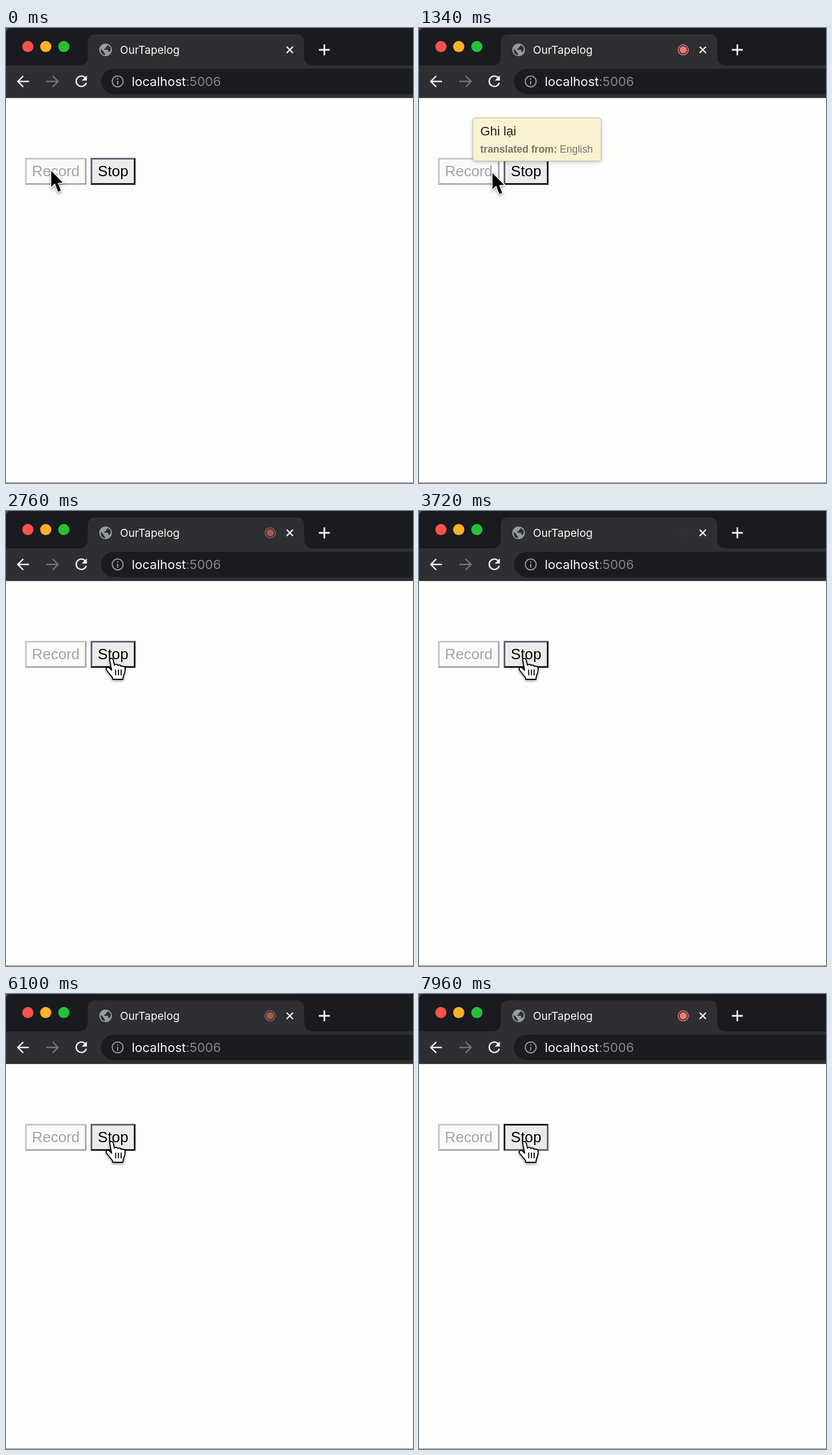
These frames come from a looping animation (707 px wide and 792 px high, 8 s). An HTML page:

```html
<!DOCTYPE html>
<html lang="en">
<head>
<meta charset="utf-8">
<title>Recorder tab</title>
<style>
html, body { margin: 0; width: 100%; height: 100%; overflow: hidden; background: #fdfdfc; }
#stage { position: relative; width: 707px; height: 792px; overflow: hidden; }
svg { position: absolute; left: 0; top: 0; }
.ui { font-family: Inter, Roboto, sans-serif; }
.button, #tip { position: absolute; box-sizing: border-box; font-family: "Liberation Sans", Arial, sans-serif; white-space: nowrap; }
.button { top: 226px; height: 47px; border: 3px solid; font-size: 25.7px; line-height: 40px; display: flex; justify-content: center; }
#record { left: 33px; width: 107px; color: #a5a5a5; background: #fafafa; border-color: #c9c7d1 #adadae #adadae #c9c7d1; }
#stop { left: 147px; width: 78px; color: #000; background: #ebebed; border-color: #686278 #1b1a20 #1b1a20 #686278; }
#stop.pressed { border-color: #1b1a20 #686278 #686278 #1b1a20; }
#tip { left: 93px; top: 156px; width: 224px; height: 76px; border: 1.5px solid #bfbba9; border-radius: 6px; background: #f8f2d1; box-shadow: 0 2px 6px #0003; }
#tip div { position: absolute; left: 12.5px; }
#word { top: 10px; font-size: 22px; line-height: 26px; color: #222; }
#origin { top: 44px; font-size: 17.5px; line-height: 21px; color: #77756c; }
</style>
</head>
<body>
<div id="stage">
  <svg width="707" height="792" fill="none">
    <rect width="707" height="122" fill="#191b21"/>
    <path d="M0 7Q1 1 7 0H0Z" fill="#55555a"/>
    <path d="M0 65H126Q142 65 142 49V25Q142 11 156 11H504Q518 11 518 25V49Q518 65 534 65H707V122H0Z" fill="#2e2f33"/>
    <path d="M0 121.500H707" stroke="#4b4b4e"/>
    <path d="M0 791.500H707" stroke="#858587"/>
    <rect x="165" y="71" width="600" height="44" rx="22" fill="#1b1c21"/>
    <circle cx="38" cy="32.300" r="9.700" fill="#ff5149"/>
    <circle cx="69" cy="32.300" r="9.700" fill="#feb225"/>
    <circle cx="100.500" cy="32.300" r="9.700" fill="#25c138"/>

    <circle cx="173" cy="38" r="11" fill="#959ba1"/>
    <path d="M164.500 36L170 41.500V43L172 45V47.500Q163.500 46 164.500 36ZM176 29.500V31Q176 33 173.500 33V35.500H171V38H177.500V41.500H180Q185.500 34 176 29.500Z" fill="#2e2f33"/>

    <g class="ui">
      <text x="198" y="44.500" font-size="19" fill="#f8f8f8">OurTapelog</text>
      <text x="218.500" y="101" font-size="22" fill="#f8f8f8">localhost<tspan fill="#85868b">:5006</tspan></text>
    </g>

    <g id="indicator" stroke="#f07b74" stroke-width="1.600">
      <circle cx="459" cy="38" r="8.800"/>
      <circle cx="459" cy="38" r="6.200" fill="#f07b74" stroke="none"/>
    </g>

    <g stroke="#f4f4f5" stroke-width="2.400">
      <path d="M487.500 32.500L498.500 43.500M498.500 32.500L487.500 43.500"/>
      <path d="M543.500 38H562.500M553 28.500V47.500" stroke-width="2.800"/>
      <path d="M40 93H21M30 83.500L20.500 93L30 102.500"/>
      <path d="M70 93H90M81 83.500L90.500 93L81 102.500" stroke="#74757a"/>
      <path d="M138 87A9 9 0 1 0 139.500 95.500"/>
      <path d="M140.500 82.500V91.500H131.500Z" fill="#f4f4f5" stroke="none"/>
    </g>
    <g stroke="#96979c" stroke-width="2">
      <circle cx="194" cy="93" r="9.500"/>
      <path d="M194 92V98.500M194 87.500V90"/>
    </g>
  </svg>

  <div id="record" class="button">Record</div>
  <div id="stop" class="button">Stop</div>
  <div id="tip">
    <div id="word">Ghi lại</div>
    <div id="origin"><b>translated from:</b> English</div>
  </div>

  <svg width="707" height="792">
    <g id="pointer" style="filter: drop-shadow(0 2px 2px #0006)">
      <path id="arrow" d="M.5 2.500V30.500L7 24.500L12.500 39L17.300 37L12 23.500L20.500 23Z" fill="#000" stroke="#fff" stroke-width="3" paint-order="stroke"/>
      <g id="hand" transform="translate(-183 -257)" stroke="#000" stroke-width="1.800" stroke-linejoin="round">
        <path fill="#fff" d="M180 259C180 256.500 185 255.500 186 258.500L188.500 268.500C190 266 194 266.500 194.500 269C196 267.500 199.500 268 200 270.500C202 269.500 206.500 270 207 273.500C207.300 279 206 283 204 287L203 293H185.500L185 290C181 285 178 281 174.500 277C172.500 274 176 270.500 179.500 273L183.500 277Z"/>
        <path d="M190.500 276V286M195.300 276V286M200 276V286"/>
      </g>
    </g>
  </svg>
</div>
<script>
const LOOP = 8000;
const PRESS_TIME = 7800;
const pointerPath = [[1000, 78, 246], [1340, 127, 250], [1660, 168, 254], [2040, 179, 256], [2240, 183, 257]];
const throb = { start: 390, rise: 560, fall: 2820 };

const byId = id => document.getElementById(id);
const progress = (t, from, to) => Math.min(1, Math.max(0, (t - from) / (to - from)));

function pointerAt(t) {
  let [, x, y] = pointerPath[0];
  for (let i = 1; i < pointerPath.length; i++) {
    const [from, x0, y0] = pointerPath[i - 1];
    const [to, x1, y1] = pointerPath[i];
    const p = progress(t, from, to);
    x += (x1 - x0) * p;
    y += (y1 - y0) * p;
  }
  return [x, y];
}

// Two quick rises with slow falls, then a last rise that stays lit.
function indicatorOpacity(t) {
  const { start, rise, fall } = throb;
  if (t < start) return 0;
  const cycle = Math.min(2, Math.floor((t - start) / (rise + fall)));
  const local = t - start - cycle * (rise + fall);
  if (local < rise) return (local / rise) ** 2;
  return cycle === 2 ? 1 : 1 - ((local - rise) / fall) ** 2;
}

function draw(t) {
  const [x, y] = pointerAt(t);
  const overStop = x >= 147;
  byId("pointer").setAttribute("transform", `translate(${x} ${y})`);
  byId("arrow").style.display = overStop ? "none" : "";
  byId("hand").style.display = overStop ? "" : "none";
  byId("tip").style.opacity = progress(t, 100, 720) - progress(t, 1440, 2055);
  byId("indicator").style.opacity = indicatorOpacity(t);
  byId("stop").classList.toggle("pressed", t >= PRESS_TIME);
}

function tick() {
  draw(performance.now() % LOOP);
  requestAnimationFrame(tick);
}
tick();
</script>
</body>
</html>
```
